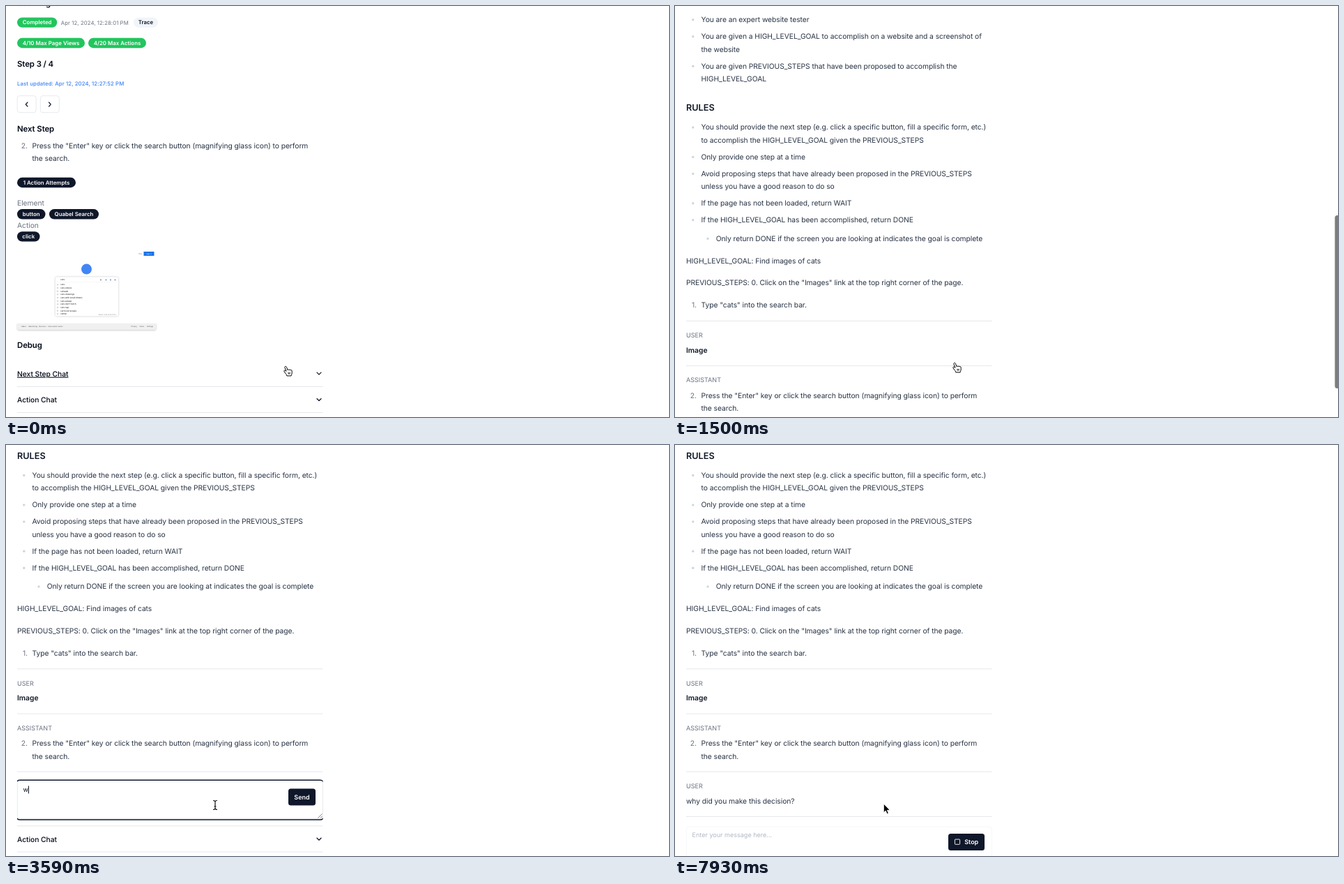
Recreate the animation shown at these times as an HTML page. Size 951 by 589 pixels, loop 8000 ms.

```html
<!DOCTYPE html>
<html lang="en">
<head>
<meta charset="utf-8">
<title>Step review</title>
<style>
  html, body { margin: 0; width: 100%; height: 100%; overflow: hidden; background: #fff; }
  svg { display: block; }
  text { font-family: Inter, "Liberation Sans", sans-serif; white-space: pre; text-rendering: geometricPrecision; }
</style>
</head>
<body>
<svg id="stage" width="951" height="589" viewBox="0 0 951 589">
  <defs>
    <clipPath id="column"><rect x="16" y="1180" width="438.6" height="90"/></clipPath>
  </defs>
</svg>
<script>
const LOOP = 8000, TICK = 150, CHAT_HEIGHT = 714, REPLY_HEIGHT = 65;
const INK = '#0f172a', GREEN = '#22c55e', LINE = '#e5e7eb', GRAY = '#6b7280';
const stage = document.getElementById('stage');
const QUESTION = 'why did you make this decision?';

// size, weight, colour, letter spacing
const STYLES = {
  body:    [10.3, 400, '#283344', -.06],
  label:   [10.3, 400, GRAY, -.05],
  title:   [11.4, 600, '#020817', -.08],
  h3:      [12.7, 600, '#111827', 0],
  toggle:  [10.3, 500, '#020817', -.05],
  strong:  [10.3, 600, '#111827', 0],
  role:    [9.05, 400, GRAY, 0],
  badge:   [7.9, 600, '#fff', 0],
  trace:   [7.8, 600, INK, 0],
  date:    [7.8, 400, GRAY, .06],
  updated: [7.75, 500, '#3b82f6', .11],
  input:   [9, 400, '#020817', 0],
  hint:    [9.05, 400, '#64748b', 0],
  button:  [9, 600, '#fff', 0],
  tiny:    [3, 500, '#333', 0],
  micro:   [2.4, 400, '#555', 0]
};

function el(parent, tag, attrs = {}) {
  const node = document.createElementNS('http://www.w3.org/2000/svg', tag);
  for (const k in attrs) node.setAttribute(k, attrs[k]);
  parent.append(node);
  return node;
}
const group = (parent, attrs) => el(parent, 'g', attrs);
const path = (parent, d, attrs) => el(parent, 'path', { d, fill: 'none', ...attrs });
const box = (parent, x, y, width, height, rx, attrs) =>
  el(parent, 'rect', { x, y, width, height, rx, ...attrs });
const rule = (parent, y) => path(parent, `M16 ${y}H454.5`, { stroke: LINE });

// y is the middle of the capitals
function text(parent, x, y, str, style = 'body', attrs = {}) {
  const [size, weight, fill, spacing] = STYLES[style];
  const node = el(parent, 'text', {
    x, y: y + size * .36, 'font-size': size, 'font-weight': weight, fill, 'letter-spacing': spacing, ...attrs
  });
  node.textContent = str;
  return node;
}
function pill(x, right, y, str, fill = INK, style = 'badge') {
  box(page, x, y - 7.2, right - x, 14.4, 7.2, { fill });
  text(page, (x + right) / 2, y, str, style, { 'text-anchor': 'middle' });
}
const lines = (parent, x, y, strs) => strs.forEach((s, i) => text(parent, x, y + i * 18.5, s));
function bullet(y, strs, x = 37.5) {
  el(chat, 'circle', { cx: x - 11.7, cy: y + .3, r: 1.7, fill: '#d1d5db' });
  lines(chat, x, y, strs);
}
function numbered(parent, y, n, strs) {
  text(parent, 31, y, n + '.', 'label', { 'text-anchor': 'end' });
  lines(parent, 37.5, y, strs);
}
const chevron = (parent, x, y) =>
  path(group(parent, { transform: `translate(${x} ${y})` }), 'M-3-1.5L0 1.5L3-1.5',
    { stroke: INK, 'stroke-width': 1.25, 'stroke-linecap': 'round', 'stroke-linejoin': 'round' });

const page = group(stage);
const PRESS = ['Press the "Enter" key or click the search button (magnifying glass icon) to perform', 'the search.'];

// Summary
text(page, 16, -4.5, 'Cat images', 'title');
pill(16, 73.3, 23.6, 'Completed', GREEN);
text(page, 78.8, 24, 'Apr 12, 2024, 12:28:01 PM', 'date');
pill(183, 218, 23.6, 'Trace', '#f1f5f9', 'trace');
pill(16, 113, 53, '4/10 Max Page Views', GREEN);
pill(118, 201, 53, '4/20 Max Actions', GREEN);
text(page, 16, 83, 'Step 3 / 4', 'title');
text(page, 16, 110.8, 'Last updated: Apr 12, 2024, 12:27:52 PM', 'updated');
[[16.2, 1], [49.3, -1]].forEach(([x, dir]) => {
  box(page, x, 128.7, 27, 24, 3.5, { fill: '#fff', stroke: LINE, 'stroke-width': .9 });
  path(page, `M${x + 13.5 + dir * 1.3} 138l${-dir * 2.7} 3l${dir * 2.7} 3`,
    { stroke: INK, 'stroke-width': 1.15, 'stroke-linecap': 'round', 'stroke-linejoin': 'round' });
});
text(page, 16, 175.8, 'Next Step', 'title');
numbered(page, 200, 2, PRESS);
pill(16, 100, 253, '1 Action Attempts');
text(page, 16, 282, 'Element', 'label');
pill(16, 56.5, 298.3, 'button');
pill(62, 133, 298.3, 'Quabel Search');
text(page, 16, 314, 'Action', 'label');
pill(16, 48.5, 330.4, 'click');

// Page preview
function drawPreview() {
  const g = group(page);
  text(g, 190.5, 355, 'Pics', 'micro');
  box(g, 197.5, 352, 15, 6, .6, { fill: '#1a73e8' });
  text(g, 205, 355, 'Sign in', 'micro', { fill: '#fff', 'text-anchor': 'middle' });
  el(g, 'circle', { cx: 115.5, cy: 377, r: 7.5, fill: '#4285f4' });
  box(g, 70.7, 388.3, 90.5, 56.2, 2.5, { fill: '#fff', style: 'filter:drop-shadow(0 .5px .8px #0004)' });
  text(g, 78, 392.4, 'cats', 'tiny');
  [136, 143.5, 150, 156.5].forEach((x, i) =>
    el(g, 'circle', { cx: x, cy: 392.4, r: 1, fill: i ? '#6d8fc9' : '#888' }));
  path(g, 'M73 395.6H159', { stroke: '#eee', 'stroke-width': .5 });
  ['cats', 'cats videos', 'catwalk', 'cats drawings', 'cats with small kittens', 'cats asleep',
    'cats don\'t fetch', 'cats nap', 'cat food recipes', 'catnip'].forEach((s, i) => {
    const y = 399.4 + i * 4.66;
    el(g, 'circle', { cx: 74, cy: y, r: .8, fill: 'none', stroke: '#999', 'stroke-width': .4 });
    text(g, 78, y, s, 'tiny');
  });
  text(g, 158.5, 442.6, 'Report odd predictions', 'micro', { 'text-anchor': 'end', fill: '#999' });
  path(g, 'M16 455H215.5V461a3 3 0 0 1-3 3H19a3 3 0 0 1-3-3z',
    { fill: '#f0f0f0', style: 'filter:drop-shadow(0 1.3px 1px #0003)' });
  [[22, 'About'], [32, 'Advertising'], [47.3, 'Business'], [60.5, 'How search works'],
    [179.5, 'Privacy'], [191.3, 'Terms'], [202, 'Settings']].forEach(([x, s]) => text(g, x, 459.4, s, 'micro'));
}
drawPreview();

text(page, 16, 485.5, 'Debug', 'title');
text(page, 16, 527, 'Next Step Chat', 'toggle',
  { 'text-decoration': 'underline', style: 'text-underline-offset:1.6px;text-decoration-thickness:1px' });
const arrow = chevron(page, 449, 526.6);

// Chat
const chat = group(page);
text(chat, 16, 552, 'SYSTEM', 'role');
text(chat, 16, 574.5, 'FACTS', 'h3');
bullet(602.5, ['You are an expert website tester']);
bullet(626.4, ['You are given a HIGH_LEVEL_GOAL to accomplish on a website and a screenshot of', 'the website']);
bullet(669, ['You are given PREVIOUS_STEPS that have been proposed to accomplish the', 'HIGH_LEVEL_GOAL']);
text(chat, 16, 728.6, 'RULES', 'h3');
bullet(756.7, ['You should provide the next step (e.g. click a specific button, fill a specific form, etc.)',
  'to accomplish the HIGH_LEVEL_GOAL given the PREVIOUS_STEPS']);
bullet(799.1, ['Only provide one step at a time']);
bullet(823.1, ['Avoid proposing steps that have already been proposed in the PREVIOUS_STEPS',
  'unless you have a good reason to do so']);
bullet(865.5, ['If the page has not been loaded, return WAIT']);
bullet(889.5, ['If the HIGH_LEVEL_GOAL has been accomplished, return DONE']);
bullet(916.1, ['Only return DONE if the screen you are looking at indicates the goal is complete'], 58.7);
text(chat, 16, 948, 'HIGH_LEVEL_GOAL: Find images of cats');
text(chat, 16, 979.7, 'PREVIOUS_STEPS: 0. Click on the "Images" link at the top right corner of the page.');
numbered(chat, 1011.6, 1, ['Type "cats" into the search bar.']);
rule(chat, 1034.4);
text(chat, 16, 1054.8, 'USER', 'role');
text(chat, 16, 1076, 'Image', 'strong');
rule(chat, 1098.6);
text(chat, 16, 1119.2, 'ASSISTANT', 'role');
numbered(chat, 1140.8, 2, PRESS);
rule(chat, 1181.7);

const reply = group(chat);
text(reply, 16, 1202.2, 'USER', 'role');
text(reply, 16, 1223.3, QUESTION);
rule(reply, 1245.9);

// Message form
const form = group(chat);
const border = box(form, 16.3, 1195.6, 438, 53, 3.5, { fill: '#fff', stroke: LINE, 'stroke-width': .9 });
const ring = group(form, { 'clip-path': 'url(#column)' });
box(ring, 14.4, 1193.7, 441.8, 56.9, 5.5, { fill: 'none', stroke: INK, 'stroke-width': 1.5 });
path(form, 'M447.5 1248l6-6M451 1248l2.5-2.5', { stroke: '#666', 'stroke-width': .8 });
const hint = text(form, 24.5, 1207.6, 'Enter your message here...', 'hint');
const typed = text(form, 24.5, 1207.6, '', 'input');
const caret = box(form, 24.5, 1202, 1, 11, 0, { fill: '#020817' });
const send = group(form);
box(send, 405, 1206, 39, 24, 3.5, { fill: INK });
text(send, 424.5, 1218.2, 'Send', 'button', { 'text-anchor': 'middle' });
const stop = group(form);
box(stop, 392, 1205.4, 52, 24, 3.5, { fill: INK });
box(stop, 401.4, 1213.6, 7.2, 7.2, .8, { fill: 'none', stroke: '#fff', 'stroke-width': .9 });
text(stop, 415.2, 1217.4, 'Stop', 'button');

// Next section, pushed down by the chat
const below = group(page);
rule(below, 545.4);
text(below, 16, 564.4, 'Action Chat', 'toggle');
chevron(below, 449, 564.2);
rule(below, 582.6);

const thumb = box(stage, 946.5, 0, 9, 248, 3.5, { fill: '#7d7d7d' });

// Pointers, hot spot at 0,0
const pointers = {
  hand: path(stage, 'M-.8 .4c-1.2 .1-1.6 1-1.2 2l2 5-1.5-1c-1.2-.7-2.3 .3-1.5 1.5l2.7 3.6c.7 .9 1 1.6 1.1 2.5h6.3' +
    'c0-1 .6-1.9 .9-2.9c.4-1.4 .3-3.4 0-4.6c-.4-1.3-1.6-1.2-1.9-.4c-.3-1.2-1.8-1.3-2.1-.3c-.3-1.1-1.8-1.1-2.1-.2' +
    'l-1.5-4.2c-.3-.7-.7-1-1.2-1zM3 9l.3 2.6M5 9v2.6', { fill: '#fff', stroke: '#000', 'stroke-width': 1, 'stroke-linejoin': 'round' }),
  arrow: path(stage, 'M0-1.2V11.6l2.9-2.7l1.9 4.5l2.2-.9l-1.9-4.4h4z',
    { fill: '#000', stroke: '#fff', 'stroke-width': .9, 'stroke-linejoin': 'round' }),
  beam: path(stage, 'M-3-6.5Q0-6.5 0-4.5Q0-6.5 3-6.5M0-5V5M-3 6.5Q0 6.5 0 4.5Q0 6.5 3 6.5M-1.5 2H1.5',
    { stroke: '#111', 'stroke-width': 1.2 })
};

// Timelines: [time, value...]
const SCROLL = [[450, 0], [600, 6], [750, 34], [900, 82], [1050, 210], [1200, 375], [1350, 510], [1500, 583],
  [1650, 602], [1800, 607], [1950, 622], [2100, 670], [2250, 704], [2400, 714], [2550, 713.5]];
const POINTER = [[150, 402, 516], [600, 402, 511], [1950, 402, 511], [2100, 388, 514], [2400, 320.5, 520],
  [2550, 304, 517], [2700, 300, 516], [7480, 300, 516], [7930, 299.3, 515.3]];
const SHAPE = [[0, 'hand'], [1800, 'arrow'], [2250, 'beam'], [7930, 'arrow']];
const TYPED = [[0, 0], [3590, 1], [3890, 3], [4190, 4], [4340, 5], [4490, 7], [4640, 8], [4790, 9], [4940, 11],
  [5090, 12], [5240, 13], [5390, 15], [5540, 16], [5690, 18], [5840, 20], [5990, 22], [6290, 23], [6440, 25],
  [6590, 27], [6730, 28], [6880, 30], [7480, 31]];
const THUMB = [[450, 0], [600, 1], [2400, 1], [2550, .5], [2700, 0]];

const held = (keys, t) => keys.filter(k => k[0] <= t).pop()[1];
function tween(keys, t, col = 1) {
  const i = keys.findIndex(k => k[0] > t);
  if (i === 0) return keys[0][col];
  if (i < 0) return keys[keys.length - 1][col];
  const a = keys[i - 1], b = keys[i];
  return a[col] + (b[col] - a[col]) * (t - a[0]) / (b[0] - a[0]);
}
const show = (node, on) => node.setAttribute('display', on ? 'inline' : 'none');
const move = (node, x, y) => node.setAttribute('transform', `translate(${x} ${y})`);

function draw(time) {
  const t = time < 2850 ? Math.floor(time / TICK) * TICK : time;
  const open = t >= 300, focus = t >= 3150 && t < 7930, sent = t >= 7930;
  const scroll = tween(SCROLL, t), shift = sent ? REPLY_HEIGHT : 0;
  const count = sent ? 0 : held(TYPED, t);

  move(page, 0, -scroll);
  move(below, 0, open ? CHAT_HEIGHT + shift : 0);
  move(form, 0, shift);
  arrow.setAttribute('transform', `rotate(${t < 300 ? 0 : t < 450 ? 90 : 180})`);
  show(chat, open);
  show(reply, sent);
  show(ring, focus);
  show(caret, focus);
  show(hint, !count);
  show(send, !sent);
  show(stop, sent);
  send.setAttribute('opacity', count ? 1 : .5);
  hint.setAttribute('opacity', sent ? .5 : 1);
  border.setAttribute('stroke-opacity', sent ? .4 : 1);

  typed.textContent = QUESTION.slice(0, count);
  caret.setAttribute('x', 24.5 + (count ? typed.getComputedTextLength() : 0));

  thumb.setAttribute('y', 56.8 + scroll * .417);
  thumb.setAttribute('opacity', tween(THUMB, t));
  const shape = held(SHAPE, t);
  for (const name in pointers) {
    show(pointers[name], name === shape);
    move(pointers[name], tween(POINTER, t), tween(POINTER, t, 2));
  }
}

const start = performance.now();
function tick() {
  draw((performance.now() - start) % LOOP);
  requestAnimationFrame(tick);
}
tick();
</script>
</body>
</html>
```
